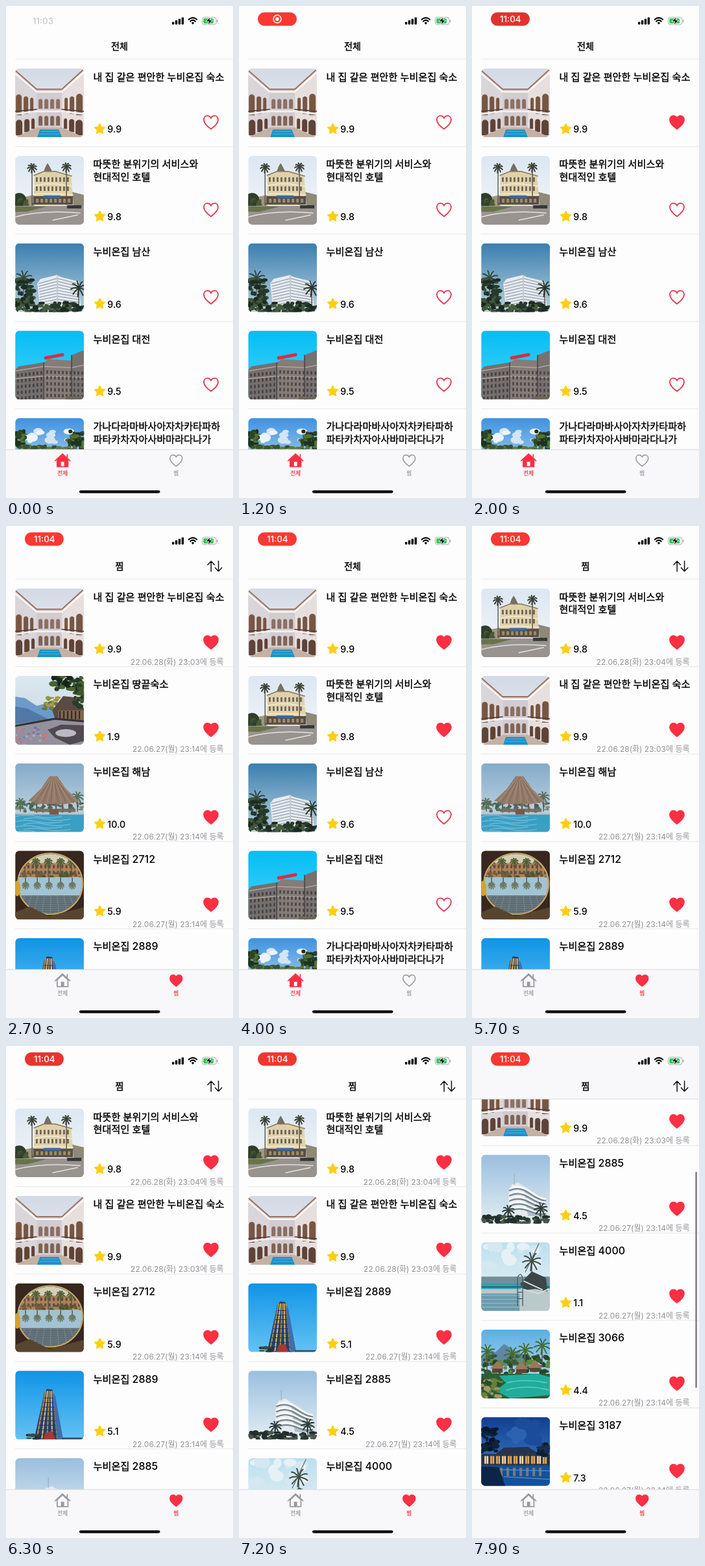
Recreate the animation shown at these times as an HTML page. Size 350 by 758 pixels, loop 8 s.

```html
<!DOCTYPE html>
<html lang="ko">
<head>
<meta charset="utf-8">
<title>숙소 찜 목록</title>
<style>
html, body { margin: 0; width: 100%; height: 100%; overflow: hidden; background: #fff; }
svg { display: block; font-family: Inter, "Noto Sans CJK KR", "Noto Sans CJK", sans-serif; }
.name, .title { font-weight: 500; stroke: #000; stroke-width: .4px; }
.name { font-size: 15.2px; }
.num { font-size: 16px; stroke: none; }
.rate { font-size: 14.3px; font-weight: 500; }
.date { font-size: 12px; fill: #929297; text-anchor: end; }
.title { font-size: 14.2px; text-anchor: middle; }
.tab { font-size: 8.6px; text-anchor: middle; stroke-width: .2px; }
.clock { font-size: 13.4px; font-weight: 500; text-anchor: middle; }
</style>
</head>
<body>
<svg id="stage" width="350" height="758" viewBox="0 0 350 758"></svg>
<script>
const LOOP = 8000, TOP = 82, PITCH = 134.7, RED = '#fc2f43', GRAY = '#98989d';
const BRAND = '누비온집';

// drawing helpers, all return markup
const rect = (x, y, w, h, fill, extra = '') =>
  `<rect x="${x}" y="${y}" width="${w}" height="${h}" fill="${fill}" ${extra}/>`;
const poly = (pts, fill) => `<polygon points="${pts}" fill="${fill}"/>`;
const oval = (x, y, rx, ry, fill) => `<ellipse cx="${x}" cy="${y}" rx="${rx}" ry="${ry}" fill="${fill}"/>`;
const line = (d, stroke, w = 1) =>
  `<path d="${d}" fill="none" stroke="${stroke}" stroke-width="${w}" stroke-linecap="round" stroke-linejoin="round"/>`;
const arch = (x, y, w, h, fill) =>
  `<path d="M${x} ${y + h}v${w / 2 - h}a${w / 2} ${w / 2} 0 0 1 ${w} 0v${h - w / 2}z" fill="${fill}"/>`;
const repeat = (n, fn) => Array.from({ length: n }, (_, i) => fn(i)).join('');
const sky = (id, a, b) =>
  `<linearGradient id="${id}" x2="0" y2="1"><stop stop-color="${a}"/><stop offset="1" stop-color="${b}"/></linearGradient>`
  + rect(0, 0, 106, 106, `url(#${id})`);

function random(seed) {
  return () => (seed = (seed * 16807) % 2147483647) / 2147483647;
}
function leaves(x, y, w, h, n, colors, seed = 7, size = 3) {
  const rnd = random(seed * 977);
  return repeat(n, i => oval((x + rnd() * w).toFixed(1), (y + rnd() * h).toFixed(1),
    (size * (.5 + rnd())).toFixed(1), (size * (.4 + rnd() * .7)).toFixed(1), colors[i % colors.length]));
}
function palm(x, y, h, size, leaf, trunk = '#5c5148') {
  return line(`M${x} ${y}v${h}`, trunk, 1.4) + repeat(9, i => {
    const a = i * Math.PI * 2 / 9 + .3, dx = Math.cos(a) * size, dy = Math.sin(a) * size;
    return line(`M${x} ${y}q${(dx * .6).toFixed(1)} ${(dy * .7 - 2).toFixed(1)} ${dx.toFixed(1)} ${(dy + 1).toFixed(1)}`, leaf, 2);
  });
}
const windows = (x, y, cols, rows, dx, dy, w, h, fill, slope = 0) =>
  repeat(cols * rows, i => {
    const c = i % cols, r = (i - c) / cols;
    return rect(x + c * dx, (y + r * dy + c * slope).toFixed(1), w, h, fill);
  });

const thumbs = {
  court: sky('g1', '#d3dae5', '#eceef2')
    + poly('0,3 33,32 33,92 0,106', '#d9d5d8') + poly('106,1 72,32 72,92 106,106', '#e6dfde')
    + rect(33, 32, 39, 60, '#d2cbcf') + line('M0 3L33 32H72L106 1', '#9c7260', 2) + line('M0 8L33 36H72L106 6', '#fff', 2)
    + [[1, 40, 9, 32], [13, 43, 7, 27], [23, 45, 5, 23], [94, 39, 10, 33], [84, 43, 7, 27], [76, 45, 5, 23]]
      .map(a => arch(...a, '#795642')).join('')
    + line('M0 70L33 66H72L106 70', '#f3efee', 3) + line('M0 66L33 63M72 63L106 66', '#4f3a34', 1.5)
    + repeat(4, i => arch(36 + i * 9, 47, 6, 15, '#8b6f63') + arch(36 + i * 9, 73, 6, 15, '#7e6355'))
    + [[1, 79, 10, 24], [14, 78, 8, 20], [25, 77, 5, 16], [93, 79, 11, 24], [83, 78, 8, 20], [75, 77, 5, 16]]
      .map(a => arch(...a, '#5f4337')).join('')
    + poly('33,91 72,91 106,106 0,106', '#c4b1a5') + poly('38,94 67,94 72,106 34,106', '#1c92c9')
    + line('M40 97H66M38 101H68', '#5dbbe0', .8),

  corner: sky('g2', '#dbe7f2', '#f6f7f8')
    + poly('0,66 30,60 30,77 0,78', '#a0967f') + poly('86,55 106,60 106,77 86,77', '#8f8a78')
    + poly('30,29 44,23 62,23 86,30 90,76 28,76', '#dfd2ab')
    + poly('44,24 47,16 50,11 53,16 57,24', '#766f62') + line('M29 30L44 24H62L87 31', '#8d7b5d', 1.6)
    + line('M29 46L46 43H62L89 47M29 59L46 58H62L89 60', '#f4edd4', 1.5)
    + windows(32, 33, 9, 2, 6, 14, 2.6, 7, '#665c50') + rect(28, 62, 61, 13, '#564d47')
    + rect(44, 61, 26, 4, '#356aa5') + windows(32, 66, 8, 1, 7, 1, 4, 6, '#9e8c68')
    + palm(26, 18, 58, 7, '#3d4035') + palm(79, 17, 58, 7, '#3d4035')
    + oval(6, 68, 11, 11, '#2f3d2b') + leaves(0, 68, 30, 8, 14, ['#354630', '#4c5a37'], 3)
    + rect(0, 77, 106, 29, '#98938f') + poly('0,78 48,78 18,86 0,86', '#687349')
    + line('M0 94Q42 83 100 88M58 99L96 91', '#e4e1de', 1.5) + rect(80, 76, 22, 5, '#35373b'),

  namsan: sky('g3', '#3b7eaf', '#b9d3df')
    + poly('34,62 39,55 64,49 70,52 98,59 101,98 38,98', '#e8ebef')
    + repeat(9, i => line(`M${36 + i * .4} ${62 + i * 4.2}L65 ${54 + i * 4.6}L99 ${63 + i * 4}`, '#92a0ad', 1.2))
    + line('M65 50V95', '#c1cbd4', 2)
    + palm(13, 54, 50, 13, '#32473a') + palm(98, 69, 35, 12, '#29372b')
    + leaves(0, 56, 27, 50, 70, ['#263a2b', '#3f5739', '#1c2a22'], 4, 4)
    + leaves(26, 92, 80, 14, 60, ['#263a2b', '#465b3a', '#1c2a22'], 5, 4),

  daejeon: sky('g4', '#05bdf4', '#4bd4fb')
    + poly('0,60 5,55 42,49 46,53 46,106 0,106', '#756f6d') + poly('44,49 52,44 88,46 92,106 44,106', '#857c77')
    + poly('86,38 106,30 106,106 86,106', '#777170')
    + line('M0 62L44 55L87 57L106 53M0 74L44 70L106 72', '#b2a59b', 1.4) + line('M44 49V106M87 38V106', '#504b4b', 1.8)
    + windows(3, 66, 7, 5, 6, 9, 2.5, 5, '#403f43', -.6) + windows(48, 61, 10, 5, 6, 9, 2.7, 5, '#494649', .2)
    + line('M47 42L73 37', '#d33143', 5) + rect(78, 101, 28, 5, '#6e6758'),

  garden: sky('g5', '#3f92e0', '#d6e8f4')
    + leaves(18, 20, 66, 18, 15, ['#eef4f9', '#d3e5f4'], 3, 6)
    + rect(0, 55, 106, 51, '#3b5831')
    + leaves(0, 20, 15, 40, 45, ['#2d4526', '#527234', '#1f3320'], 8, 4)
    + leaves(82, 20, 24, 36, 50, ['#2d4526', '#527234', '#1f3320'], 9, 4)
    + leaves(8, 44, 80, 20, 55, ['#37552c', '#5d7b3d'], 2, 4),

  lands: sky('g6', '#dce8ef', '#c3d3e1')
    + poly('0,32 15,34 33,46 55,41 70,73 0,76', '#6d9bc9') + poly('0,47 18,50 52,67 0,74', '#5178a7')
    + leaves(45, 33, 21, 22, 30, ['#8b9a43', '#5d7b3b', '#b0964c'], 3, 3)
    + poly('57,53 74,31 91,33 106,50 106,71 62,67', '#594a42') + rect(66, 53, 40, 16, '#80654d')
    + windows(68, 54, 6, 1, 6, 1, 2, 13, '#30282a')
    + leaves(57, 0, 49, 21, 60, ['#283e26', '#49642e', '#172519'], 6, 4) + leaves(92, 17, 14, 30, 30, ['#283e26', '#3f5a2c'], 5, 4)
    + poly('0,78 60,66 106,70 106,106 0,106', '#92919d') + line('M0 77L61 66L106 70', '#393032', 3)
    + poly('50,83 71,75 106,76 106,100 84,106 61,95', '#514a50') + oval(78, 88, 16, 6, '#babac6')
    + leaves(0, 80, 48, 26, 34, ['#d37284', '#b7a0bc', '#6d79b1'], 7, 2),

  hut: sky('g7', '#84abc9', '#d1dee6')
    + leaves(0, 61, 106, 13, 55, ['#54705b', '#7c8d72', '#455f50'], 6, 3)
    + palm(96, 52, 22, 9, '#577058') + palm(8, 61, 13, 8, '#577058')
    + poly('53,20 65,20 78,39 99,59 76,63 42,63 20,58 40,39', '#947969')
    + repeat(13, i => line(`M${56 + i * .5} 22L${26 + i * 5.8} ${59 + (i % 3)}`, i % 2 ? '#806a5b' : '#a58d7c', 1.1))
    + repeat(6, i => rect(32 + i * 10, 62, 2, 17, '#66564e')) + rect(29, 70, 64, 5, '#776d62')
    + rect(0, 77, 106, 29, '#3a9fc5') + rect(0, 76, 106, 3, '#b5c6ca')
    + repeat(7, i => line(`M${i % 2 * 13} ${82 + i * 4}q18 -4 34 0t38 0`, '#82c5dc', 1)) + rect(53, 71, 14, 8, '#7b574a'),

  n2712: rect(0, 0, 106, 106, '#38271f')
    + '<clipPath id="port"><ellipse cx="54" cy="51" rx="49" ry="46"/></clipPath>'
    + '<g clip-path="url(#port)">' + rect(0, 0, 106, 106, '#d4ceb7') + rect(0, 19, 106, 22, '#aa815a')
    + windows(6, 22, 15, 2, 6.5, 9, 3, 5, '#61483b')
    + [15, 32, 51, 70, 87].map(x => palm(x, 17, 24, 6, '#4f6137')).join('')
    + leaves(0, 34, 106, 8, 40, ['#49582f', '#735c3b'], 4, 3) + rect(0, 41, 106, 34, '#a1c3d3')
    + [16, 34, 52, 70, 88].map(x => palm(x, 53, -11, 5, '#6c7a62')).join('')
    + rect(0, 69, 106, 37, '#58676d')
    + repeat(12, i => line(`M${i * 14 - 30} 106L${i * 10 - 5} 70M0 ${71 + i * 3}H106`, '#82929a', .7)) + '</g>'
    + '<ellipse cx="54" cy="51" rx="50" ry="47" fill="none" stroke="#cba966" stroke-width="2"/>'
    + oval(3, 58, 5, 12, '#d5a231') + poly('0,95 22,86 53,101 106,87 106,106 0,106', '#58452f'),

  n2889: sky('g9', '#1094e6', '#64c2f3')
    + poly('45,34 49,28 57,29 60,36 69,106 29,106', '#27416f')
    + repeat(5, i => line(`M${47 + i * 2.8} 32L${33 + i * 8} 106`, i % 2 ? '#dcba61' : '#b78d3c', 2))
    + repeat(10, i => line(`M${45 - i * 1.4} ${42 + i * 7}H${60 + i * .9}`, '#1c3260', .9))
    + poly('58,35 62,40 74,106 65,106', '#3f6eac') + poly('46,96 57,93 62,106 44,106', '#a83832')
    + leaves(20, 99, 20, 7, 12, ['#233331', '#3c4938'], 4) + rect(72, 103, 34, 3, '#385069'),

  n2885: sky('g10', '#9abfdf', '#e3edf2')
    + poly('42,61 47,46 57,43 78,56 96,70 101,96 42,95', '#e5eaee') + poly('66,54 96,71 101,96 72,94', '#b1bfca')
    + repeat(5, i => line(`M44 ${55 + i * 8}Q58 ${48 + i * 8} 74 ${59 + i * 7}T99 ${71 + i * 5}`, '#75858f', 2.2)
      + line(`M44 ${52 + i * 8}Q58 ${45 + i * 8} 74 ${56 + i * 7}T99 ${68 + i * 5}`, '#fff', 2))
    + line('M51 46V30', '#879ba8', .7) + palm(42, 86, 20, 9, '#2e3f3b') + palm(92, 83, 20, 10, '#2e3f3b')
    + leaves(0, 95, 106, 11, 65, ['#29382f', '#48564a', '#1f2e2c'], 6, 4),

  n4000: sky('g11', '#bcdfef', '#eef4f5')
    + leaves(10, 6, 83, 35, 17, ['#e5f1f5', '#d3e8f1'], 2, 9) + rect(0, 53, 106, 12, '#748f94')
    + rect(0, 63, 106, 10, '#26a5b3') + rect(0, 72, 106, 34, '#bac9cc') + rect(0, 79, 59, 27, '#6b9cad')
    + repeat(4, i => line(`M0 ${82 + i * 6}H58`, '#9bc0cb', 1)) + rect(0, 68, 106, 2, '#3c5961')
    + palm(78, 29, 42, 14, '#3c4943') + line('M89 2L68 46', '#5c6463', 1.2)
    + poly('60,64 78,45 100,55 102,76 84,72 66,74', '#3c4649') + line('M62 72L88 79L104 72M66 60L94 73', '#d4dcda', 2)
    + line('M56 98V54Q62 44 64 57V98M56 77H64M56 87H64', '#425d67', 1.3),

  n3066: sky('g12', '#5aaee5', '#d6e7ef')
    + poly('0,40 14,31 22,35 35,22 48,30 58,36 73,41 73,56 0,56', '#5f87a2')
    + leaves(0, 40, 106, 28, 90, ['#355b2c', '#64883d', '#25462a'], 5, 4)
    + [[9, 34], [48, 38], [68, 32], [94, 25]].map(([x, y]) => palm(x, y, 32, 12, '#446b30')).join('')
    + [[25, 48], [62, 49], [83, 47]].map(([x, y]) => poly(`${x},${y} ${x + 11},${y + 12} ${x - 11},${y + 12}`, '#9a795b')
      + rect(x - 8, y + 12, 16, 6, '#58453a')).join('')
    + rect(0, 68, 106, 38, '#2d5d34') + poly('27,71 87,68 106,73 106,101 45,106 22,94 38,82', '#20ad9c')
    + line('M40 82Q65 75 101 82M39 93Q72 84 104 93', '#64cfbd', 1.3)
    + leaves(0, 77, 31, 29, 42, ['#274d2a', '#65813a', '#a49968'], 8, 4),

  n3187: sky('g13', '#123f93', '#4389cf')
    + leaves(49, 8, 57, 34, 12, ['#2c62b0', '#1b4c9b'], 3, 10)
    + leaves(0, 18, 24, 36, 50, ['#07162a', '#10243a'], 4, 4)
    + poly('22,57 35,47 72,46 90,57', '#26334c') + rect(0, 57, 106, 18, '#28334a')
    + repeat(11, i => rect(5 + i * 9, 60, 6, 12, i % 3 ? '#e9ad59' : '#f7dfa6') + rect(7.5 + i * 9, 58, 1, 17, '#594238'))
    + rect(0, 75, 106, 31, '#155099') + repeat(9, i => rect(9 + i * 10, 78, 4, 13, '#b89461', 'opacity=".6"'))
    + poly('0,76 27,77 37,106 0,106', '#0c2547') + line('M29 81L106 83M35 92L106 96', '#4e91cf', 1.2)
    + leaves(88, 42, 18, 16, 24, ['#0c1d33', '#18304c'], 5, 4)
};

const hotels = {
  court: [[`내 집 같은 편안한 ${BRAND} 숙소`], '9.9'],
  corner: [['따뜻한 분위기의 서비스와', '현대적인 호텔'], '9.8'],
  namsan: [[`${BRAND} 남산`], '9.6'],
  daejeon: [[`${BRAND} 대전`], '9.5'],
  garden: [['가나다라마바사아자차카타파하', '파타카차자아사바마라다나가'], '9.4'],
  lands: [[`${BRAND} 땅끝숙소`], '1.9'],
  hut: [[`${BRAND} 해남`], '10.0'],
  n2712: [[`${BRAND} 2712`], '5.9'],
  n2889: [[`${BRAND} 2889`], '5.1'],
  n2885: [[`${BRAND} 2885`], '4.5'],
  n4000: [[`${BRAND} 4000`], '1.1'],
  n3066: [[`${BRAND} 3066`], '4.4'],
  n3187: [[`${BRAND} 3187`], '7.3']
};
const homeKeys = Object.keys(hotels).slice(0, 5);
const savedKeys = ['corner', 'court', ...Object.keys(hotels).slice(5)];
const savedAt = { corner: '22.06.28(화) 23:04', court: '22.06.28(화) 23:03' };

// timeline, ms
const liked = { court: 1600, corner: 3800 };
const removed = { lands: 5300, hut: 6000, n2712: 6900, n2889: 7300 };
const tabs = [[0, 'home'], [2300, 'saved'], [3300, 'home'], [4400, 'saved']];
const SCROLL = { from: 7500, to: 7900, dist: 198, content: 1085 };

const HEART = 'M0 10.3C-5 6.7-11 2-11-3.8C-11-7.5-8.6-10-5.6-10C-3.1-10-1-8.6 0-6.5C1-8.6 3.1-10 5.6-10C8.6-10 11-7.5 11-3.8C11 2 5 6.7 0 10.3Z';
const STAR = repeat(10, i => {
  const r = i % 2 ? 4.2 : 8.3, a = i * Math.PI / 5 - Math.PI / 2;
  return `${(Math.cos(a) * r).toFixed(2)},${(Math.sin(a) * r).toFixed(2)} `;
});

function row(list, key) {
  const [names, rate] = hotels[key], saved = list === 'saved';
  return `<g id="${list}-${key}">
    <use href="#t-${key}" x="14.2" y="14.2" clip-path="url(#round)"/>
    ${names.map((s, i) => `<text class="name" x="134.6" y="${32.6 + i * 19.4}">${s.replace(/\d+/, '<tspan class="num">$&</tspan>')}</text>`).join('')}
    <polygon points="${STAR}" transform="translate(144.6 107.6)" fill="#fdcf12" stroke="#fdcf12" stroke-width="1.6" stroke-linejoin="round"/>
    <text class="rate" x="156.3" y="113.2">${rate}</text>
    <path class="heart" d="${HEART}" transform="translate(316 97.2)" fill="${saved ? RED : 'none'}" stroke="${saved ? RED : '#e2344b'}" stroke-width="1.8"/>
    ${saved ? `<text class="date" x="335.5" y="131.6">${savedAt[key] || '22.06.27(월) 23:14'}에 등록</text>` : ''}
    ${rect(14, PITCH - .5, 336, 1, '#e6e5e9')}</g>`;
}

const statusIcons = repeat(4, i => rect(256 + i * 4.9, 24.4 - i * 2.3, 3.4, 4 + i * 2.3, '#000', 'rx="1"'))
  + line('M281.8 20.8Q288 15.3 294.2 20.8M284.2 23.6Q288 20.2 291.8 23.6', '#000', 2.1) + poly('285.8,26 288,24.6 290.2,26 288,28.6', '#000')
  + '<rect x="302.5" y="17.3" width="21.5" height="11.4" rx="3.4" fill="#fff" stroke="#aaa9ad"/>'
  + rect(304.2, 19, 16, 8, '#35c75a', 'rx="2"') + rect(325, 21, 1.5, 4, '#aaa9ad', 'rx=".7"')
  + '<path d="M315.5 16.3L308.2 24H312.6L311 29.8L318.4 21.8H314Z" fill="#000" stroke="#fff" stroke-width=".9"/>';

const stage = document.getElementById('stage');
stage.innerHTML = `<defs>
    <clipPath id="round"><rect width="106" height="106" rx="6.5"/></clipPath>
    ${Object.entries(thumbs).map(([k, v]) => `<g id="t-${k}">${v}</g>`).join('')}
  </defs>
  ${rect(0, 0, 350, 758, '#fefdfe')}
  <g id="home">${homeKeys.map(k => row('home', k)).join('')}</g>
  <g id="saved">${savedKeys.map(k => row('saved', k)).join('')}</g>
  <rect id="bar" x="344.3" width="2.7" height="333" rx="1.35" fill="#858488"/>
  <rect id="nav" width="350" height="${TOP}"/>
  <rect id="hair" x="14" y="81.3" width="350" height="1" fill="#e9e8ec"/>
  <text id="title" class="title" x="175" y="67"></text>
  <g id="sort">${line('M316.2 70V54.5M311 59.7L316.2 54.2L321.4 59.7M327.6 54V69.5M322.4 64.3L327.6 69.8L332.8 64.3', '#111', 1.5)}</g>
  ${statusIcons}
  <text id="old" class="clock" x="57" y="28">11:03</text>
  <g id="pill"><rect id="pillBg" x="29" y="9.8" width="60" height="20.6" rx="10"/>
    <g id="rec"><circle cx="59" cy="20.1" r="6" fill="none" stroke="#fff" stroke-width="1.5"/><circle cx="59" cy="20.1" r="2.8" fill="#fff"/></g>
    <text id="now" class="clock" x="59.3" y="24.9" fill="#fff">11:04</text></g>
  ${rect(0, 683, 350, 75, '#f8f7f9')}${rect(0, 682.8, 350, .9, '#d5d4d8')}
  <g id="tabHome"><g transform="translate(87.2 700)" stroke-width="1.7" stroke-linejoin="round" stroke-linecap="round">
    <path id="house" d="M-8.3-1V9.7H8.3V-1L0-8.4Z"/><path d="M-11.4 .6L0-10L11.4 .6M7.2-4V-9" fill="none"/>
    <path id="door" d="M-2.4 9V2.2H2.4V9Z" stroke="none"/></g>
    <text class="tab" x="87.2" y="723.3">전체</text></g>
  <g id="tabSaved"><path id="tabHeart" d="${HEART}" transform="translate(262.3 700.3) scale(.86)" stroke-width="1.8"/>
    <text class="tab" x="262.3" y="723.3">찜</text></g>
  ${rect(113, 746.2, 124.5, 4.2, '#000', 'rx="2.1"')}`;

const $ = id => document.getElementById(id);
const set = (id, attrs) => { for (const k in attrs) $(id).setAttribute(k, attrs[k]); };
const show = (id, on) => set(id, { display: on ? 'inline' : 'none' });
const clamp = v => Math.min(1, Math.max(0, v));

function drawStatus(t) {
  const dim = ((1 + Math.cos((t - 4700) / 1400 * 2 * Math.PI)) / 2) ** 2;
  set('old', { opacity: .2 * clamp(1 - t / 100) });
  set('pill', { opacity: clamp((t - 50) / 250) });
  set('pillBg', { fill: `rgb(${252 - 30 * dim},${56 - 6 * dim},${50 - 6 * dim})` });
  show('rec', t < 2000);
  show('now', t >= 2000);
}

function drawTabs(home) {
  const color = on => ({ fill: on ? RED : GRAY, stroke: on ? RED : GRAY });
  set('tabHome', color(home));
  set('tabSaved', color(!home));
  set('house', { fill: home ? RED : 'none' });
  set('door', { fill: home ? '#fff' : GRAY });
  set('tabHeart', { fill: home ? 'none' : RED });
}

function drawList(t, home) {
  const p = clamp((t - SCROLL.from) / (SCROLL.to - SCROLL.from));
  const y = SCROLL.dist * (1 - (1 - p) ** 2);
  homeKeys.forEach((k, i) => {
    set('home-' + k, { transform: `translate(0 ${TOP + i * PITCH})` });
    if (!liked[k]) return;
    const heart = $('home-' + k).querySelector('.heart');
    heart.setAttribute('fill', t >= liked[k] ? RED : 'none');
    heart.setAttribute('stroke', t >= liked[k] ? RED : '#e2344b');
  });
  let i = 0;
  for (const k of savedKeys) {
    const on = t >= (liked[k] || 0) && t < (removed[k] || LOOP);
    show('saved-' + k, on);
    if (on) set('saved-' + k, { transform: `translate(0 ${TOP + i++ * PITCH - y})` });
  }
  show('home', home);
  show('saved', !home);
  set('bar', { y: TOP + 2 + y * 601 / SCROLL.content, opacity: clamp(p * 4) });
  set('nav', { fill: y > 0 ? '#f8f7f9' : '#fefdfe' });
  set('hair', { x: y > 0 ? 0 : 14, fill: y > 0 ? '#d8d7db' : '#e9e8ec' });
}

function draw(t) {
  const home = tabs.filter(([at]) => at <= t).pop()[1] === 'home';
  $('title').textContent = home ? '전체' : '찜';
  show('sort', !home);
  drawStatus(t);
  drawTabs(home);
  drawList(t, home);
}

const start = performance.now();
function tick() {
  draw((performance.now() - start) % LOOP);
  requestAnimationFrame(tick);
}
tick();
</script>
</body>
</html>
```
